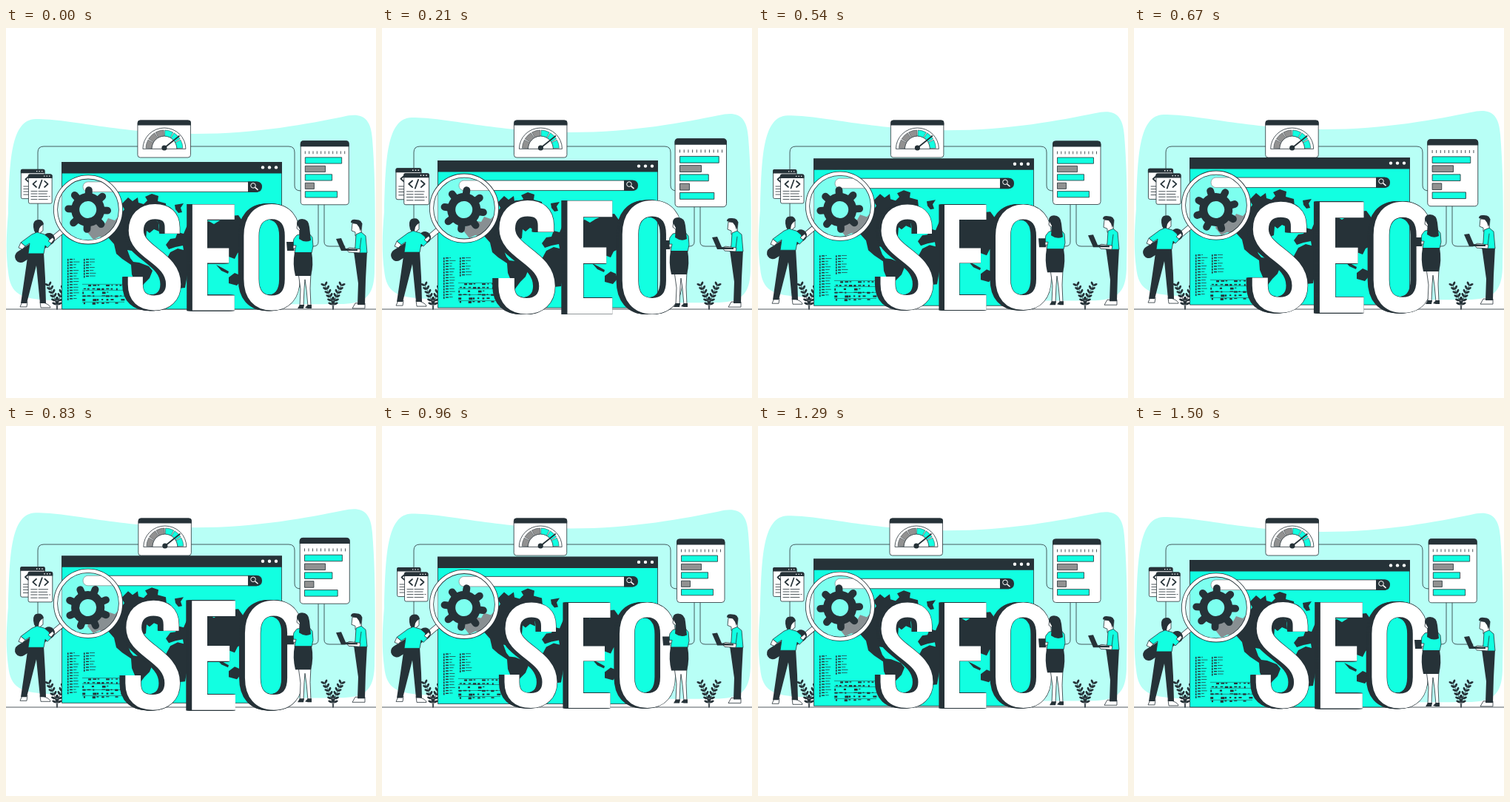
Animation, 500 px wide and 500 px high, one loop 1.54 s. Source, as an HTML page:

```html
<!DOCTYPE html>
<html lang="en">
<head>
<meta charset="utf-8">
<title>SEO</title>
<style>
  html, body { margin: 0; height: 100%; overflow: hidden; background: #fff; }
  svg { display: block; width: 100%; height: 100%; }
  .line { fill: none; stroke: #263238; stroke-width: .8; stroke-linecap: round; stroke-linejoin: round; }
  .bold { stroke-width: 1.7; }
  .dark { fill: #263238; }
  .teal { fill: #12ffe1; }
  .white { fill: #fff; }
  .grey { fill: #919191; }
  .edge { stroke: #263238; stroke-width: .8; stroke-linejoin: round; }
  .face { fill: none; stroke-linejoin: miter; }
</style>
</head>
<body>
<svg viewBox="0 0 500 500">
  <defs>
    <path id="letters" d="M225 278V270C225 255 216 248.500 202 248.500C186 248.500 176.500 258 176.500 274C176.500 304 226.500 310 226.500 346C226.500 362 216 371 201 371C185 371 175.500 363 175.500 346V336
      M308.500 249H262V371H308.500M262 307.500H301
      M331 281C331 260 341 248.500 358.500 248.500S386 260 386 281V339C386 360 376 371 358.500 371S331 360 331 339Z"/>
    <g id="plant">
      <path class="line" d="M0 0Q-2-16-11-32M0 0Q2-16 11-32M0 0V-14"/>
      <g class="dark" id="leaves"></g>
    </g>
  </defs>

  <path class="float" fill="#b8fff6" d="M3 250C5 180 6 124 40 123C90 123 150 142 255 143C340 143 410 129 455 120C480 114 493 120 495 150C500 210 499 280 498 330C497 364 484 373 450 373C350 374 150 372 60 368C20 366 6 360 3 330C-1 300 1 275 3 250Z"/>

  <path class="line" d="M43 262V168Q43 160 51 160H382Q390 160 390 168V213Q390 220 398 220M422 238V289Q422 295 415 295H386M430 238V289Q430 295 437 295H458"/>
  <path class="line" d="M0 380H500"/>
  <use href="#plant" x="69" y="380"/>
  <use href="#plant" x="442" y="380"/>

  <g class="float">
    <path class="teal edge" d="M75.500 182H372.500V380H75.500Z"/>
    <path class="dark" d="M75 181H373V196.500H75Z"/>
    <g class="white"><circle cx="347" cy="188.500" r="2.200"/><circle cx="356" cy="188.500" r="2.200"/><circle cx="365" cy="188.500" r="2.200"/></g>
    <rect class="white edge" x="104" y="208" width="241" height="13.500" rx="6.700"/>
    <path class="dark" d="M327 207.600H339Q346 208 346 214.700T339 222H327Z"/>
    <g stroke="#fff" fill="none"><circle cx="334" cy="213" r="3.300"/><path stroke-width="1.500" d="M336.500 215.500L340.500 219"/></g>
    <g class="dark">
      <path d="M110 276L114 267 124 262 134 264 138 257 147 260 155 252 160 245 156 238 165 229 171 234 178 229 179 236 186 238 191 233 188 228 197 224 206 227 205 234 216 237 217 247 211 254 205 249 199 256 206 263 207 275 200 272 194 277 190 274 189 286 178 291 170 301 164 300 168 311 172 316 180 317 193 322 198 328 194 338 187 345 178 357 175 345 170 333 169 320 157 312 149 305 146 292 138 283 126 282 118 286Z"/>
      <path d="M228 239L240 237 236 243 238 249 233 250 229 245Z"/>
      <path d="M216 293L222 285 229 284 232 276 240 278 246 264 262 267 274 261 281 265 289 260 303 254 314 253 322 264 341 266 342 276 332 280 326 291 318 291 319 301 313 304 309 312 301 309 294 315 288 306 281 303 274 316 266 309 255 303 246 301 245 314 250 323 245 334 242 351 232 352 229 332 218 327 215 316 222 303 232 298 240 300 239 294 229 296 220 299Z"/>
      <path d="M284 320L292 324 301 329 300 332 291 328Z"/>
      <path d="M301 337L309 331 316 334 318 341 312 348 301 345Z"/>
    </g>
    <g class="dark" id="table"></g>
  </g>

  <g class="shake">
    <rect class="white edge" x="178" y="125" width="71.500" height="50" rx="3.500"/>
    <path class="dark" d="M178 131.500V128Q178 124.600 182 124.600H246Q250 124.600 250 128V131.500Z"/>
    <path class="line" d="M185 163A29 28 0 0 1 243 163ZM197 163A17 17 0 0 1 231 163"/>
    <g id="dial"></g>
    <path class="line bold" d="M214 162L234 146"/>
    <circle class="dark" cx="214" cy="162" r="3.600"/>
  </g>

  <g class="beat" data-at="430.500 196">
    <rect class="white edge" x="398.500" y="153" width="64.500" height="85.500" rx="4"/>
    <path class="dark" d="M398 160.500V157Q398 152.600 402 152.600H459Q463.400 152.600 463.400 157V160.500Z"/>
    <path class="line" id="ticks"/>
    <g id="bars" class="edge"></g>
  </g>

  <g class="beat" data-at="41 214">
    <g id="page">
      <rect class="white edge" x="20.500" y="191.500" width="31.500" height="39" rx="2"/>
      <path class="dark" d="M20 196.500V193Q20 191 22 191H50Q52.400 191 52.400 193V196.500Z"/>
      <path stroke="#fff" stroke-width="1.300" stroke-dasharray="1.300 2.200" d="M41 193.800H51"/>
      <path class="line bold" d="M31 200.500L26.500 204.500 31 208.500M42 200.500L46.500 204.500 42 208.500M38.500 199L34.500 210"/>
      <path class="line" stroke-dasharray="8 2 12 2" d="M24 214H48M24 217.500H45M24 221H49M24 225H46"/>
    </g>
    <use href="#page" x="10" y="6.500"/>
  </g>

  <g class="beat" data-at="272 309.500">
    <g id="depth" class="face" stroke="#263238" stroke-width="21.200"></g>
    <use href="#letters" class="face" stroke="#fff" stroke-width="20"/>
  </g>

  <g class="float">
    <circle cx="111" cy="245.500" r="42" fill="#fff" fill-opacity=".45"/>
    <path d="M79 272L61 287" stroke="#263238" stroke-width="7.500"/>
    <path d="M79 272L61 287" stroke="#fff" stroke-width="6"/>
    <circle cx="111" cy="245.500" r="44" fill="none" stroke="#263238" stroke-width="6"/>
    <circle cx="111" cy="245.500" r="44" fill="none" stroke="#fff" stroke-width="4.400"/>
  </g>

  <g id="gear" fill="none" stroke="#263238">
    <circle r="17" stroke-width="11"/>
    <g id="teeth" stroke-width="9.800" stroke-linecap="round"></g>
  </g>

  <g class="float">
    <path stroke="#263238" stroke-width="16" stroke-linecap="round" d="M20 309L58 285"/>
    <path class="white edge" d="M22 370L19 377H28L29 370ZM46 370L47 378H60Q60 375 53 372Z"/>
    <path class="dark" d="M30 303H51L53 338 54 372H46L41 321 28 372H20L25 338Z"/>
    <path class="white edge" d="M40 270V279L46 281 47 276 50 274 50 265H42Z"/>
    <path class="dark" d="M38 274Q35 263 40 260Q49 257 51 265L47 268 45 271 44 276 40 277Z"/>
    <path class="teal edge" d="M35 279L42 276 52 279 58 284 61 292 56 297 53 294 51 305H30L32 291 26 295 20 290Z"/>
    <path class="white edge" d="M20 290L26 295 22 299 17 297ZM57 288L63 283 65 286 61 291Z"/>

    <path class="white edge" d="M395 331L398 353 397 376H402L403 352 404 340 406 354 408 376H412L411 352 412 331Z"/>
    <path class="dark" d="M397 374H403L402 379H394ZM408 374H413V379H408L404 378Z"/>
    <path class="white edge" d="M394 262L393 271 397 274V281H405V262Z"/>
    <path class="teal edge" d="M393 280L409 277 414 283 415 295 413 304H390L391 298 387 296 389 285Z"/>
    <path class="dark" d="M379 289H388.500L389.500 301H380Z"/>
    <path class="white edge" d="M388 294L392 294 391 298 388 298Z"/>
    <path class="dark" d="M390 303H413Q416 320 412 335H391Q387 319 390 303ZM393 265Q393 258 400 258Q409 258 410 269L412 287Q404 291 396 285L397 272Z"/>

    <path class="white edge" d="M472 372L468 379H485V372Z"/>
    <path class="dark" d="M470 302H488L486 340 485 374H475L476 345Z"/>
    <path class="white edge" d="M468 264L467 274 472 276V281L480 279 481 264Z"/>
    <path class="dark" d="M466 263Q466 258 473 259Q482 259 481 267L479 275 477 269 474 265Z"/>
    <path class="teal edge" d="M473 279L480 276 486 281 488 304H470L472 295Z"/>
    <path class="line" d="M480 284L478 300"/>
    <path class="white edge" d="M479 299L464 297 460 299 463 303 478 304Z"/>
    <path class="dark" d="M446 285L453 284 459 298 475 299V301H453Z"/>
  </g>
</svg>
<script>
const LOOP = 1540, PERIOD = 1500, LEAD = 10;
const find = id => document.getElementById(id);
const all = name => [...document.querySelectorAll("." + name)];
const count = (n, make) => Array.from({ length: n }, (_, i) => make(i)).join("");
const rect = (x, y, w, h, cls = "") => `<rect class="${cls}" x="${x}" y="${y}" width="${w}" height="${h}"/>`;

let seed = 7;
const random = () => (seed = seed * 16807 % 2147483647) / 2147483647;

find("table").innerHTML =
  [[83, 15], [105, 7]].map(([x, rows]) => count(rows, i => {
    const y = 312 + i * 3.8;
    return rect(x, y, 1.5, 2.8) + rect(x + 3, y, 4, 1.4) + rect(x + 8, y, 2 + random() * 7, .7);
  })).join("") +
  count(6, r => count(9, c => random() < .3 ? "" :
    rect(103 + c * 6.3 + random() * 2, 347 + r * 4.8, 1.5 + random() * 3.5, 1 + random() * 2))) +
  count(4, r => rect(103, 346 + r * 8, 57, .5));

// Pairs of leaves climbing two curved stems.
find("leaves").innerHTML = [-1, 1].map(side => count(6, i => {
  const t = .2 + i * .16, x = side * (4 * t * (1 - t) + 11 * t * t), y = -32 * t;
  return [-1, 1].map(d => `<ellipse cx="3" rx="3" ry="1.500" transform="translate(${x} ${y}) rotate(${-90 + side * 20 + d * 48})"/>`).join("");
})).join("");

find("dial").innerHTML = count(6, i => {
  const point = (r, a) => `${214 + r * Math.cos(a)} ${163 + r * Math.sin(a)}`;
  const a = Math.PI * (1 + i / 6) + .03, b = a + Math.PI / 6 - .06;
  return `<path class="${i < 3 ? "grey" : "teal"} edge" style="stroke-width:.5" d="M${point(17, a)}L${point(25, a)}A25 25 0 0 1 ${point(25, b)}L${point(17, b)}A17 17 0 0 0 ${point(17, a)}"/>`;
});

find("ticks").setAttribute("d", count(11, i => `M${404.5 + i * 5.3} 167v3`));
find("bars").innerHTML = [49, 27, 36, 12, 43].map((w, i) =>
  rect(404.5, 175 + i * 11.4, w, 8.2, i % 2 ? "grey" : "teal")).join("");
find("depth").innerHTML = count(8, i => `<use href="#letters" x="${i - 7}"/>`);
find("teeth").innerHTML = count(8, i => `<path d="M0-19V-26.500" transform="rotate(${i * 45})"/>`);

// Linear interpolation through [position, value] stops.
function track(stops, p) {
  const i = Math.max(1, stops.findIndex(s => s[0] >= p));
  const [a, from] = stops[i - 1], [b, to] = stops[i];
  return from + (to - from) * (p - a) / (b - a);
}
const FLOAT = [[0, 0], [.5, -6.5], [1, 0]];
const BEAT = [[0, 1], [.1, 1.1], [.3, 1], [.4, 1], [.5, 1.1], [.6, 1], [1, 1]];
const SHAKE = [0, -1, 2, -4, 4, -4, 4, -4, 2, -1, 0].map((x, i) => [i / 10, x]);

const floating = all("float"), beating = all("beat"), shaking = all("shake"), gear = find("gear");
const start = performance.now();

function draw(now) {
  const time = Math.max(0, now - start) % LOOP;
  const p = (time + LEAD) / PERIOD % 1;
  const move = (items, value) => items.forEach(e => e.setAttribute("transform", value));
  move(floating, `translate(0 ${track(FLOAT, p)})`);
  move(shaking, `translate(${track(SHAKE, p)} 0)`);
  const scale = track(BEAT, p);
  beating.forEach(e => {
    const [x, y] = e.dataset.at.split(" ");
    e.setAttribute("transform", `translate(${x} ${y}) scale(${scale}) translate(${-x} ${-y})`);
  });
  gear.setAttribute("transform", `translate(110.7 245.5) rotate(${p * 360})`);
  requestAnimationFrame(draw);
}
draw(start);
</script>
</body>
</html>
```
